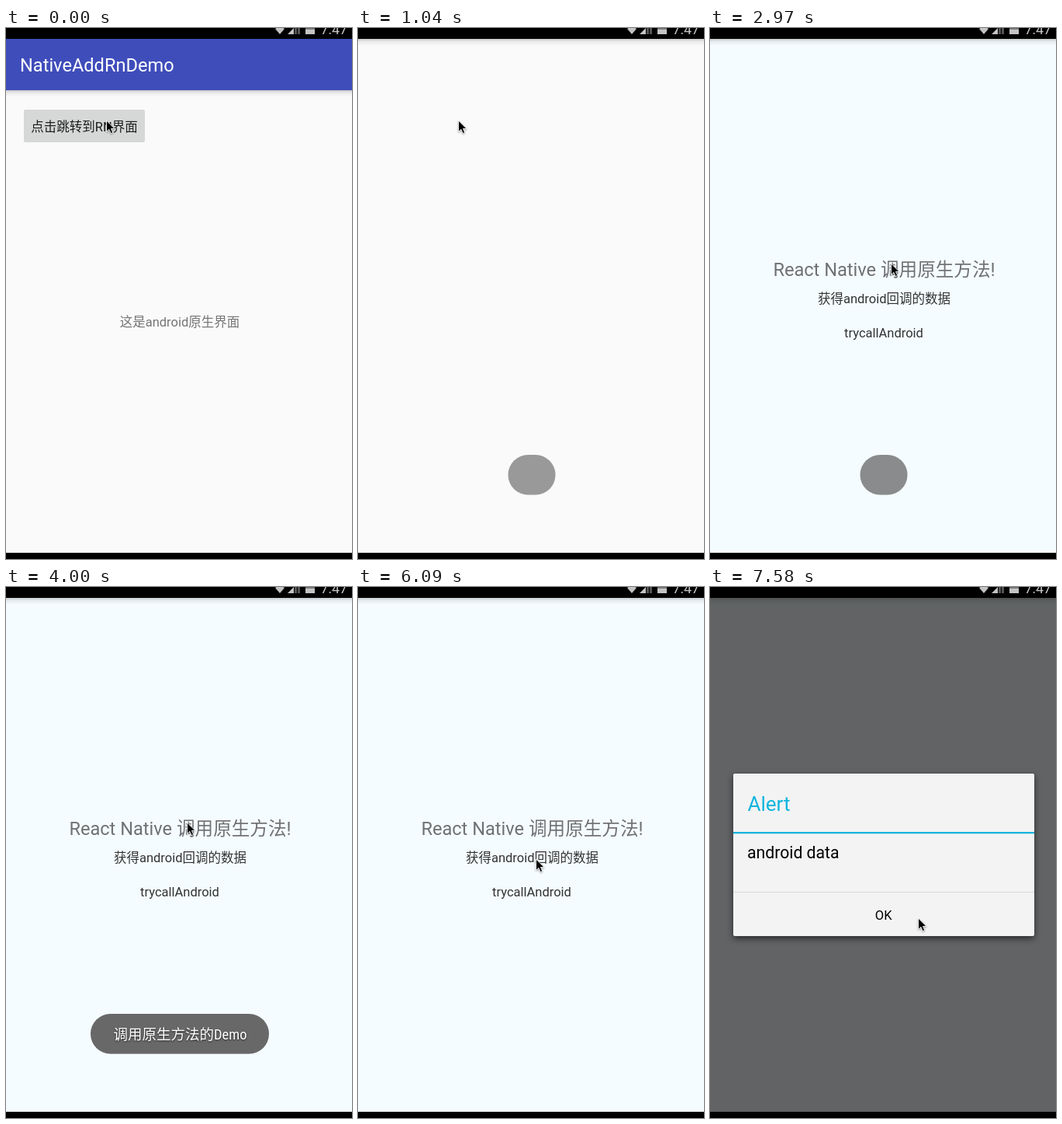
Recreate the animation shown at these times as an HTML page. Size 446x683 px, loop 8 s.

```html
<!DOCTYPE html>
<html lang="zh-CN">
<head>
<meta charset="utf-8">
<style>
  html, body { margin: 0; width: 100%; height: 100%; overflow: hidden; background: #000; }
  svg { display: block; width: 446px; height: 683px; font-family: Roboto, "Noto Sans CJK SC", "Noto Sans CJK", sans-serif; }
  text { white-space: pre; }
  .mid { text-anchor: middle; }
  .body { font-size: 16.5px; }
  .title { font-size: 23.6px; }
  .toast text { font-family: "Roboto Condensed", Roboto, "Noto Sans CJK SC", "Noto Sans CJK", sans-serif;
    font-stretch: 75%; font-size: 18.5px; fill: #fff; filter: drop-shadow(0 1px 1px #0009); }
  #panel { filter: drop-shadow(0 3px 4px #0009); }
  #cursor { filter: drop-shadow(0 1px 1px #0006); }
</style>
</head>
<body>
<svg viewBox="0 0 446 683">
  <defs>
    <linearGradient id="fade" x2="0" y2="1">
      <stop stop-opacity=".2"/>
      <stop offset=".4" stop-opacity=".06"/>
      <stop offset="1" stop-opacity="0"/>
    </linearGradient>
    <clipPath id="screen"><path d="M0 14H446V675H0z"/></clipPath>
  </defs>
  <rect width="446" height="683"/>

  <!-- status bar, cut off by the top edge -->
  <g fill="#c4c4c4">
    <path d="M347 1Q353 -3 359 1L353 8z"/>
    <path d="M363 8L371 0V8z"/>
    <path d="M372 8V-1H375V8zM376 8V-5H379V8z" fill="#555"/>
    <path d="M386 0H398V3H386z" fill="#777"/>
    <path d="M386 2H398V8H386z"/>
    <text x="405.5" y="7.5" font-size="18">7:47</text>
  </g>

  <g clip-path="url(#screen)">
    <g id="home">
      <path d="M0 14H446V675H0z" fill="#fafafa"/>
      <path d="M0 14H446V80H0z" fill="#3f4dbb"/>
      <path d="M0 80H446V89H0z" fill="url(#fade)"/>
      <text class="title" x="18" y="56" fill="#fff">NativeAddRnDemo</text>
      <rect x="23" y="105" width="156" height="42" rx="2" fill="#d6d7d7"/>
      <text class="mid body" x="101" y="133" fill="#1e1e1e">点击跳转到RN界面</text>
      <text class="mid body" x="224" y="384" fill="#757575">这是android原生界面</text>
    </g>

    <g id="page">
      <path id="paper" d="M0 14H446V675H0z"/>
      <path d="M0 14H446V23H0z" fill="url(#fade)"/>
      <g id="content" class="mid body" fill="#333">
        <text class="title" x="224.5" y="318.5" fill="#707173">React Native 调用原生方法!</text>
        <text x="224.5" y="354">获得android回调的数据</text>
        <text x="224" y="398">trycallAndroid</text>
      </g>
    </g>

    <g id="blank" class="toast">
      <rect x="193.5" y="549" width="61" height="51.5" rx="25.7" fill="#686868"/>
    </g>
    <g id="note" class="toast mid">
      <rect x="109" y="549" width="230" height="51.5" rx="25.7" fill="#686868"/>
      <text x="224.5" y="582">调用原生方法的Demo</text>
    </g>

    <path id="dim" d="M0 14H446V675H0z"/>
    <g id="dialog">
      <rect id="panel" x="30" y="240" width="388" height="209" rx="2" fill="#f3f3f3"/>
      <path d="M30 315H418V317.3H30z" fill="#10b5de"/>
      <path d="M30 392H418V393H30z" fill="#d6d6d6"/>
      <text x="48.5" y="287.5" font-size="26" fill="#10b5de">Alert</text>
      <text x="48" y="349" font-size="21.2">android data</text>
      <text class="mid body" x="223.7" y="427.5">OK</text>
    </g>
  </g>

  <path id="cursor" d="M0 0V14.5L3.4 11.4L5.7 16.6L8.2 15.5L6 10.5H10.5z" stroke="#fff" stroke-width=".9"/>
</svg>
<script>
const LOOP = 8000, STEP = 148.4;
const $ = id => document.getElementById(id);
const set = (id, name, value) => $(id).setAttribute(name, value);
const smooth = u => u * u * (3 - 2 * u);

// value at step n along [step, value] points
function along(n, points, ease = u => u) {
  let [a, v] = points[0];
  for (const [b, w] of points) {
    if (n < b) return n <= a ? v : v + (w - v) * ease((n - a) / (b - a));
    [a, v] = [b, w];
  }
  return v;
}

// a toast that appears at step s and starts to leave 13 steps later
const toast = (n, s, rise) => along(n, [[s - 1, 0], [s, rise], [s + 1, .9], [s + 2, 1],
  [s + 12, 1], [s + 13, .76], [s + 14, .25], [s + 15, 0]]);

function draw(now) {
  const n = Math.floor(now % LOOP / STEP + .06);

  set("page", "opacity", along(n, [[5, 0], [6, .6], [7, 1]]));
  set("page", "transform", `translate(0 ${along(n, [[6, 24], [7, 0]])})`);
  set("paper", "fill", n < 9 ? "#fafafa" : "#f5fcff");
  set("content", "opacity", n < 9 ? 0 : 1);

  set("blank", "opacity", toast(n, 7, .66));
  set("note", "opacity", toast(n, 25, .4));

  const size = along(n, [[46, .972], [47, 1]]);
  set("dim", "opacity", along(n, [[45, 0], [46, .15], [47, .52], [48, .605]]));
  set("dialog", "opacity", along(n, [[45, 0], [46, .72], [47, 1]]));
  set("dialog", "transform", `translate(224 344.5) scale(${size}) translate(-224 -344.5)`);

  const x = along(n, [[10, 129], [14, 233], [36, 233], [41, 229], [47, 229], [51, 268]], smooth);
  const y = along(n, [[10, 119], [14, 303], [36, 303], [41, 350], [47, 350], [51, 426]], smooth);
  set("cursor", "transform", `translate(${x + .5} ${y})`);
}

const start = performance.now();
function tick() {
  draw(performance.now() - start);
  requestAnimationFrame(tick);
}
tick();
</script>
</body>
</html>
```
